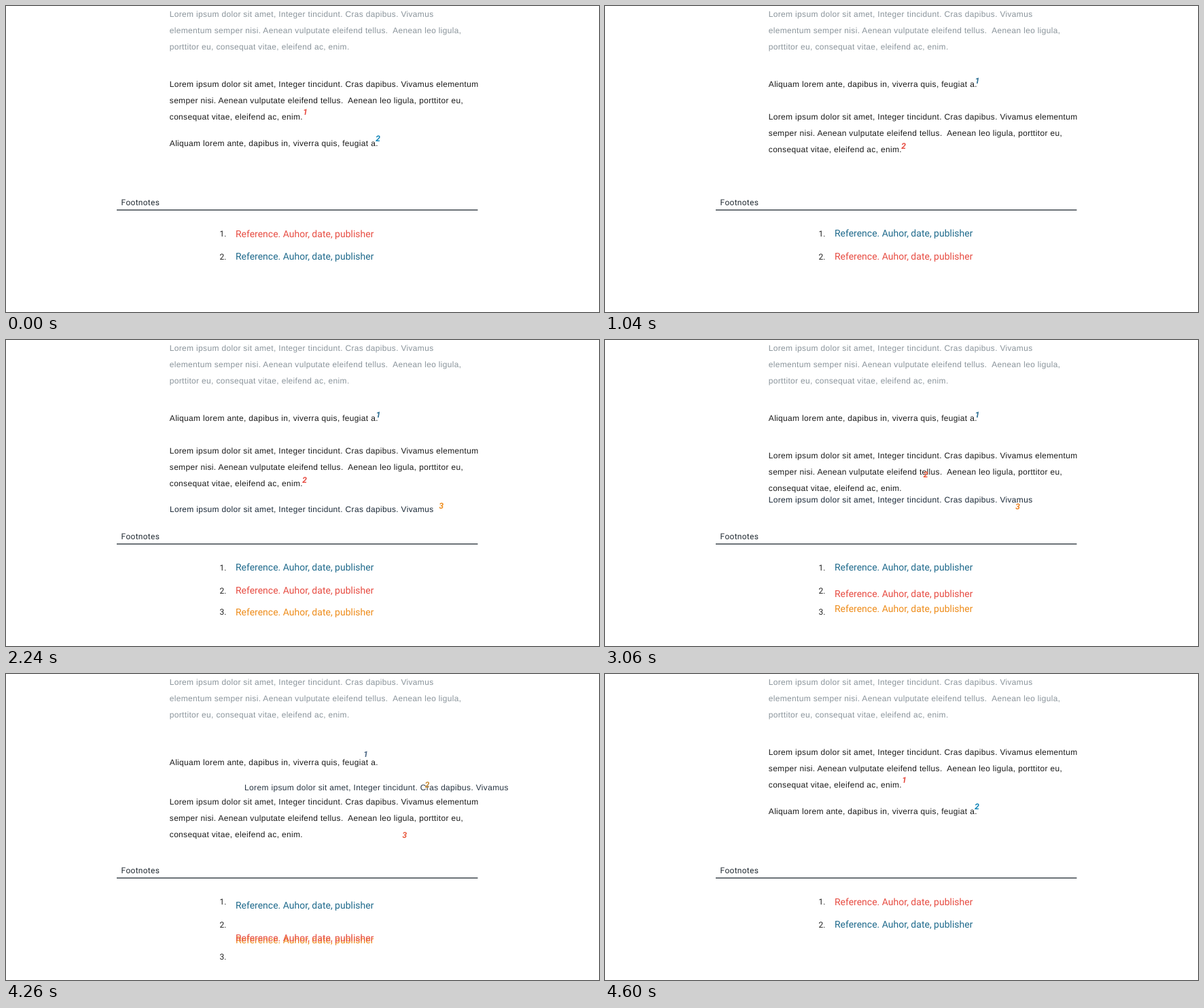
Recreate the animation shown at these times as an HTML page. Size 873x450 px, loop 4960 ms.

```html
<!DOCTYPE html>
<html lang="en">
<head>
<meta charset="utf-8">
<title>Footnotes</title>
<style>
html, body { margin: 0; width: 100%; height: 100%; overflow: hidden; background: #fff; }
svg { display: block; width: 873px; height: 450px; }
text { white-space: pre; text-rendering: geometricPrecision; }
.body { font: 12px "Liberation Sans", Arial, sans-serif; letter-spacing: .325px; fill: #1a1a1a; }
.past { fill: #8a949b; }
.added { fill: #1c2a38; }
.head { font: 12px Roboto, sans-serif; letter-spacing: .28px; fill: #222b33; }
.num { font: 12px Roboto, sans-serif; fill: #222; }
.ref { font: 14px Roboto, sans-serif; }
.mark { font: italic 700 12px Roboto, sans-serif; text-anchor: middle; }
</style>
</head>
<body>
<svg id="stage" viewBox="0 0 873 450"></svg>
<script>
const NS = "http://www.w3.org/2000/svg";
const stage = document.getElementById("stage");
const LOOP = 4960, STEP = 20, SPAN = 390;
const STARTS = [686, 1889, 3049, 4248.6];

const RED = [231, 76, 66], BLUE = [42, 109, 146], SKY = [15, 132, 184], ORANGE = [238, 140, 26];
const LEFT = 240.8, REF_X = 337.9, NUM_X = 314.6;
const REF = "Reference. Auhor, date, publisher";
const SHORT = "Lorem ipsum dolor sit amet, Integer tincidunt. Cras dapibus. Vivamus";

function add(tag, attrs, parent = stage) {
  const el = document.createElementNS(NS, tag);
  for (const k in attrs) el.setAttribute(k, attrs[k]);
  parent.appendChild(el);
  return el;
}

function block(cls, lines, x = 0, y = 0) {
  const g = add("g", { transform: `translate(${x} ${y})` });
  lines.forEach((s, i) => {
    add("text", { class: cls, x: 0, y: i * 24 }, g).textContent = s;
  });
  return g;
}

// Each moving part has one pose per arrangement: [x, y, colour, opacity]
const parts = [];
function part(cls, lines, poses) {
  parts.push({ el: block(cls, lines), poses });
}

block("body past", [
  SHORT,
  "elementum semper nisi. Aenean vulputate eleifend tellus.  Aenean leo ligula,",
  "porttitor eu, consequat vitae, eleifend ac, enim."
], LEFT, 16);
block("head", ["Footnotes"], 169.6, 293);
add("line", { x1: 163, x2: 694.5, y1: 300, y2: 300, stroke: "#3c464c", "stroke-width": 1.5 });
block("num", ["1."], NUM_X, 339);
block("num", ["2."], NUM_X, 373);

const column = (x, ys) => ys.map(y => [x, y]);
const tinted = (x, color, ys) => ys.map(y => [x, y, color]);

part("num", ["3."], column(NUM_X, [496, 496, 404.3, 404.3]));

part("body", [
  SHORT + " elementum",
  "semper nisi. Aenean vulputate eleifend tellus.  Aenean leo ligula, porttitor eu,",
  "consequat vitae, eleifend ac, enim."
], column(LEFT, [119, 167, 167, 207.7]));
part("body", ["Aliquam lorem ante, dapibus in, viverra quis, feugiat a."],
  column(LEFT, [206, 119, 119, 119]));
part("body added", [SHORT], [
  [881, 193, null, .7], [881, 193, null, .7], [LEFT, 253, null, 1], [LEFT, 166.3, null, 1]
]);

part("ref", [REF], tinted(REF_X, [31, 106, 140], [373, 339, 339, 339]));
part("ref", [REF], tinted(REF_X, ORANGE, [503, 503, 405, 373.6]));
part("ref", [REF], tinted(REF_X, RED, [340, 373, 373, 404.5]));

part("mark", ["1"], [
  [440.5, 160.3, RED], [548, 114.3, BLUE], [548, 114.3, BLUE], [548, 114.3, BLUE]
]);
part("mark", ["2"], [
  [547.6, 199.3, SKY], [439.6, 210.3, RED], [439.6, 210.3, RED], [635.2, 160.4, ORANGE]
]);
part("mark", ["3"], [
  [1285, 188.3, ORANGE], [1285, 188.3, ORANGE], [640.8, 248.3, ORANGE], [441.6, 252.5, RED]
]);

const mix = (a, b, p) => a + (b - a) * p;

// cubic-bezier(.16, 1, .3, 1)
function ease(u) {
  if (u <= 0) return 0;
  if (u >= 1) return 1;
  let lo = 0, hi = 1;
  for (let i = 0; i < 24; i++) {
    const s = (lo + hi) / 2, r = 1 - s;
    const x = .48 * s * r * r + .9 * s * s * r + s * s * s;
    if (x < u) lo = s; else hi = s;
  }
  return 1 - (1 - lo) ** 3;
}

function draw(ms) {
  const t = Math.floor((ms % LOOP) / STEP + .01) * STEP;
  const n = STARTS.filter(s => t >= s).length;
  const from = n ? n - 1 : 0, to = n % 4;
  const p = n ? ease((t - STARTS[n - 1]) / SPAN) : 0;
  for (const { el, poses } of parts) {
    const a = poses[from], b = poses[to];
    el.setAttribute("transform", `translate(${mix(a[0], b[0], p).toFixed(2)} ${mix(a[1], b[1], p).toFixed(2)})`);
    if (a[2]) el.setAttribute("fill", `rgb(${a[2].map((c, i) => Math.round(mix(c, b[2][i], p)))})`);
    if (a[3]) el.setAttribute("opacity", mix(a[3], b[3], p).toFixed(3));
  }
}

const begin = performance.now();
function tick() {
  draw(performance.now() - begin);
  requestAnimationFrame(tick);
}
draw(0);
requestAnimationFrame(tick);
</script>
</body>
</html>
```
